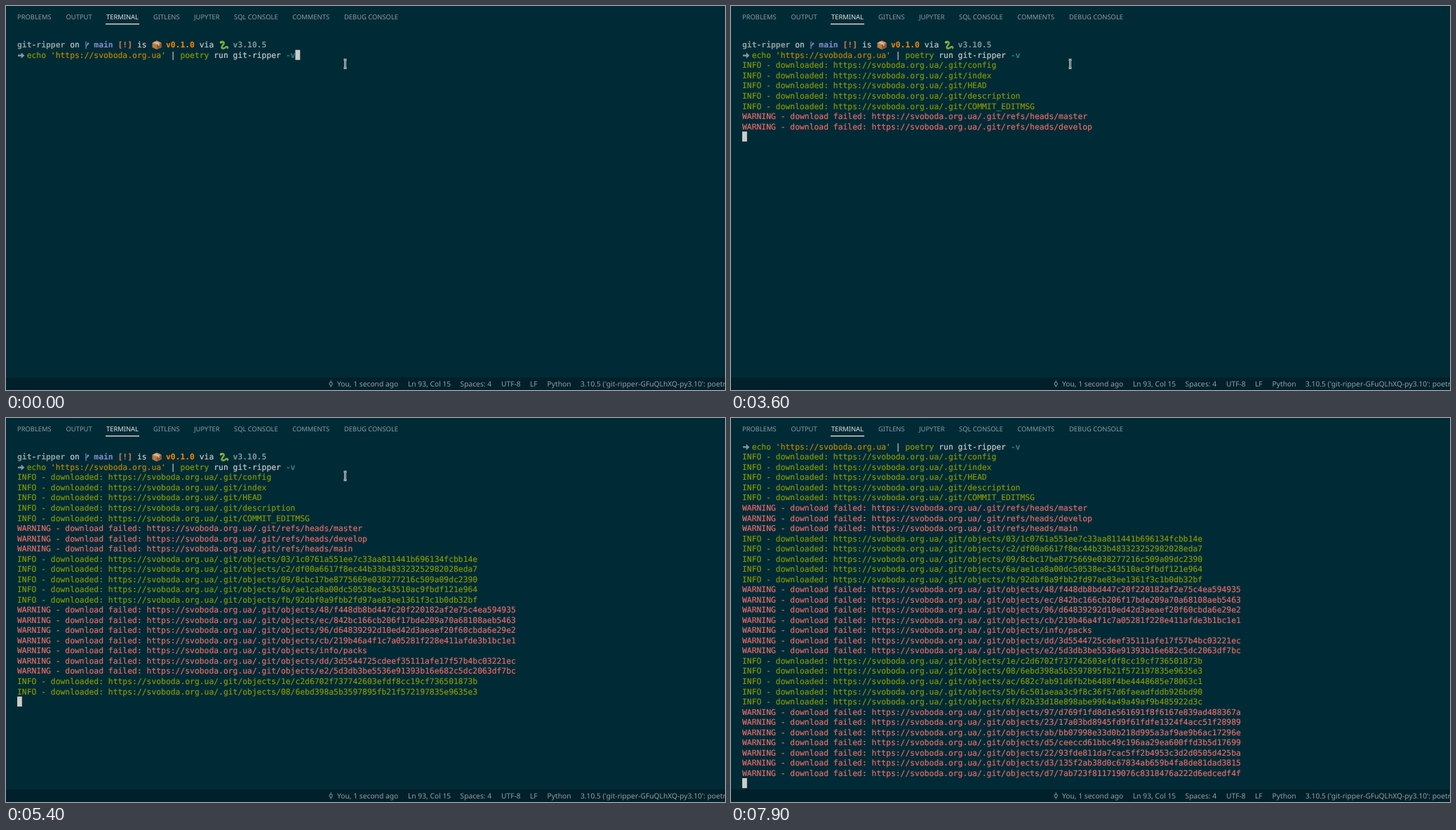
These frames come from a looping animation (1025 by 547 pixels, 8 s). An HTML page with a canvas:

```html
<!DOCTYPE html>
<html lang="en">
<head>
<meta charset="utf-8">
<title>Terminal session</title>
<style>
  html, body { margin: 0; width: 100%; height: 100%; overflow: hidden; background: #002b36; }
  canvas { display: block; }
</style>
</head>
<body>
<canvas id="stage" width="1025" height="547"></canvas>
<script>
const ctx = document.getElementById('stage').getContext('2d');
const LOOP = 8000;
const CELL = 6.835, ROW = 14.53, LEFT = 16, TOP = 33.52, ROWS = 34;
const MONO = '11.35px "DejaVu Sans Mono", monospace';
const GREEN = '#859900', RED = '#e76b68', LIGHT = '#cccccc', GREY = '#93a1a1', VIOLET = '#898dd0';
const SITE = 'https://svoboda.org.ua';

// Each run: column, text, colour, bold
const PROMPT = [
  [0, 'git-ripper', GREY, true], [11, 'on', LIGHT], [16, 'main', VIOLET, true],
  [21, '[!]', '#db7d56', true], [25, 'is', LIGHT], [31, 'v0.1.0', '#ff8700', true],
  [38, 'via', LIGHT], [45, 'v3.10.5', '#83959c', true],
];
const COMMAND = [
  [2, 'echo', GREEN], [7, `'${SITE}'`, '#b58900'], [32, '|', LIGHT],
  [34, 'poetry', GREEN], [41, 'run git-ripper', LIGHT], [56, '-v', '#2aa198'],
];
const COMMAND_END = 58;

const info = path => [[0, `INFO - downloaded: ${SITE}/.git/${path}`, GREEN]];
const warning = path => [[0, `WARNING - download failed: ${SITE}/.git/${path}`, RED]];
const object = name => 'objects/' + name;

const LOGS = [
  ...['config', 'index', 'HEAD', 'description', 'COMMIT_EDITMSG'].map(info),
  ...['refs/heads/master', 'refs/heads/develop', 'refs/heads/main'].map(warning),
  ...[
    '03/1c0761a551ee7c33aa811441b696134fcbb14e',
    'c2/df00a6617f8ec44b33b483323252982028eda7',
    '09/8cbc17be8775669e038277216c509a09dc2390',
    '6a/ae1ca8a00dc50538ec343510ac9fbdf121e964',
    'fb/92dbf0a9fbb2fd97ae83ee1361f3c1b0db32bf',
  ].map(object).map(info),
  ...[
    '48/f448db8bd447c20f220182af2e75c4ea594935',
    'ec/842bc166cb206f17bde209a70a68108aeb5463',
    '96/d64839292d10ed42d3aeaef20f60cbda6e29e2',
    'cb/219b46a4f1c7a05281f228e411afde3b1bc1e1',
    'info/packs',
    'dd/3d5544725cdeef35111afe17f57b4bc03221ec',
    'e2/5d3db3be5536e91393b16e682c5dc2063df7bc',
  ].map(object).map(warning),
  ...[
    '1e/c2d6702f737742603efdf8cc19cf736501873b',
    '08/6ebd398a5b3597895fb21f572197835e9635e3',
    'ac/682c7ab91d6fb2b6488f4be4448685e78063c1',
    '5b/6c501aeaa3c9f8c36f57d6faeadfddb926bd90',
    '6f/82b33d18e898abe9964a49a49af9b485922d3c',
  ].map(object).map(info),
  ...[
    '97/d769f1fd8d1e561691f8f6167e839ad488367a',
    '23/17a03bd8945fd9f61fdfe1324f4acc51f28989',
    'ab/bb07998e33d0b218d995a3af9ae9b6ac17296e',
    'd5/ceeccd61bbc49c196aa29ea600ffd3b5d17699',
    '22/93fde811da7cac5ff2b4953c3d2d0505d425ba',
    'd3/135f2ab38d0c67834ab659b4fa8de81dad3815',
    'd7/7ab723f811719076c8318476a222d6edcedf4f',
  ].map(object).map(warning),
];
const LINES = [[], PROMPT, COMMAND, ...LOGS];

// [time, number of log lines printed]; -1 while the command still waits for Enter
const OUTPUT = [
  [0, -1], [400, 0], [1700, 1], [2000, 2], [2700, 5],
  [3600, 7], [3700, 9], [3800, 11], [3900, 13],
  [5000, 15], [5100, 17], [5200, 19], [5300, 20], [5400, 22], [5500, 24], [5600, 25],
  [6000, 28], [7400, 31], [7500, 32],
];

const TABS = [
  [16, 'PROBLEMS'], [85.5, 'OUTPUT'], [143, 'TERMINAL'], [210, 'GITLENS'], [268, 'JUPYTER'],
  [325, 'SQL CONSOLE'], [408.3, 'COMMENTS'], [482, 'DEBUG CONSOLE'],
];
const STATUS = [
  [472, 'You, 1 second ago'], [573, 'Ln 93, Col 15'], [647.5, 'Spaces: 4'], [706, 'UTF-8'],
  [747, 'LF'], [771.5, 'Python'], [819, "3.10.5 ('git-ripper-GFuQLhXQ-py3.10': poetry)"],
];

function rect(x, y, w, h, color) {
  ctx.fillStyle = color;
  ctx.fillRect(x, y, w, h);
}

function fillPath(path, color) {
  ctx.fillStyle = color;
  ctx.fill(new Path2D(path));
}

function strokePath(path, color, width) {
  ctx.strokeStyle = color;
  ctx.lineWidth = width;
  ctx.stroke(new Path2D(path));
}

function label(x, y, text, size, color) {
  ctx.font = `${size}px "Noto Sans", sans-serif`;
  ctx.fillStyle = color;
  ctx.fillText(text, x, y);
}

// A hairline stroke gives the glyphs a slightly heavier weight.
function drawRun([col, text, color, bold], top) {
  ctx.font = (bold ? 'bold ' : '') + MONO;
  ctx.fillStyle = ctx.strokeStyle = color;
  ctx.lineWidth = .2;
  [...text].forEach((ch, i) => {
    const x = LEFT + (col + i) * CELL, y = top + 11.3;
    ctx.fillText(ch, x, y);
    if (!bold) ctx.strokeText(ch, x, y);
  });
}

function drawPromptIcons() {
  // branch
  strokePath('M114 2.5V13M114 10C114 7.5 117 8.5 117 5.5M115.6 6.5L117 4.5L118.3 6.5', VIOLET, 1.1);
  // package
  fillPath('M208.5 4.5L215 1.5L221.5 4.5V11L215 14L208.5 11Z', '#b47a4c');
  fillPath('M215 7.5L221.5 4.5V11L215 14Z', '#8f5a36');
  fillPath('M208.5 4.5L215 1.5L221.5 4.5L215 7.5Z', '#d29a68');
  strokePath('M211.3 3.2L217.8 6.2V8.5', '#e8cfa8', 1.3);
  // snake
  strokePath('M306 4C309 1.5 312 4 310 6.5C307.5 9.5 306 12.5 310 12.3C313 12.2 313 9.5 315 10C316.5 10.5 316 12 316.5 12.5',
    '#7fa83c', 2.6);
  strokePath('M305.2 4.3L307.7 3.2', '#a3c455', 2.8);
}

function drawArrow() {
  fillPath('M17 6.7H21.7V3.6L26.4 7.9L21.7 12.2V9.1H17Z', '#86969c');
}

function drawPointer(top) {
  const beam = 'M481.5 1.5H482.5L483.5 2.3L484.5 1.5H485.5M483.5 2V13' +
    'M481.5 13.5H482.5L483.5 12.7L484.5 13.5H485.5';
  ctx.save();
  ctx.translate(0, top);
  strokePath(beam, '#f0f0f0', 2.6);
  strokePath(beam, '#1c2a2e', .8);
  ctx.restore();
}

function drawChrome() {
  rect(0, 0, 1025, 547, '#002b36');
  TABS.forEach(([x, text]) =>
    label(x, 18.9, text, 9.4, text === 'TERMINAL' ? '#e7e7e7' : '#8b9ca0'));
  rect(142, 25, 48, 1.3, '#e7e7e7');
  rect(0, 529, 1025, 18, '#00212b');
  strokePath('M463.2 533.5V536M463.2 540.3V543M465.4 538.2A2.2 2.2 0 1 1 461 538.2A2.2 2.2 0 1 1 465.4 538.2', GREY, 1);
  STATUS.forEach(([x, text]) => label(x, 541.8, text, 10.25, GREY));
}

function drawLine(line, top) {
  LINES[line].forEach(run => drawRun(run, top));
  ctx.save();
  ctx.translate(0, top);
  if (LINES[line] === PROMPT) drawPromptIcons();
  if (LINES[line] === COMMAND) drawArrow();
  ctx.restore();
}

function draw(printed, pointerTop) {
  const typing = printed < 0;
  const cursorLine = typing ? 2 : 3 + printed;
  const scroll = Math.max(0, cursorLine - ROWS + 1);
  const topOf = line => TOP + (line - scroll) * ROW;

  drawChrome();
  for (let line = scroll; line < 3 + Math.max(0, printed); line++) drawLine(line, topOf(line));
  rect(LEFT + (typing ? COMMAND_END * CELL : 0), topOf(cursorLine), CELL, ROW - .3, LIGHT);
  if (pointerTop !== null) drawPointer(pointerTop);
}

ctx.textRendering = 'geometricPrecision';
ctx.lineJoin = 'round';
const start = performance.now();
let shown = '';

function tick() {
  const t = (performance.now() - start) % LOOP;
  const printed = OUTPUT.findLast(([time]) => time <= t)[1];
  const pointerTop = t < 7800 ? 75 : t < 7900 ? 62 : null;
  const state = `${printed}/${pointerTop}`;
  if (state !== shown) draw(printed, pointerTop);
  shown = state;
  requestAnimationFrame(tick);
}
tick();
</script>
</body>
</html>
```
